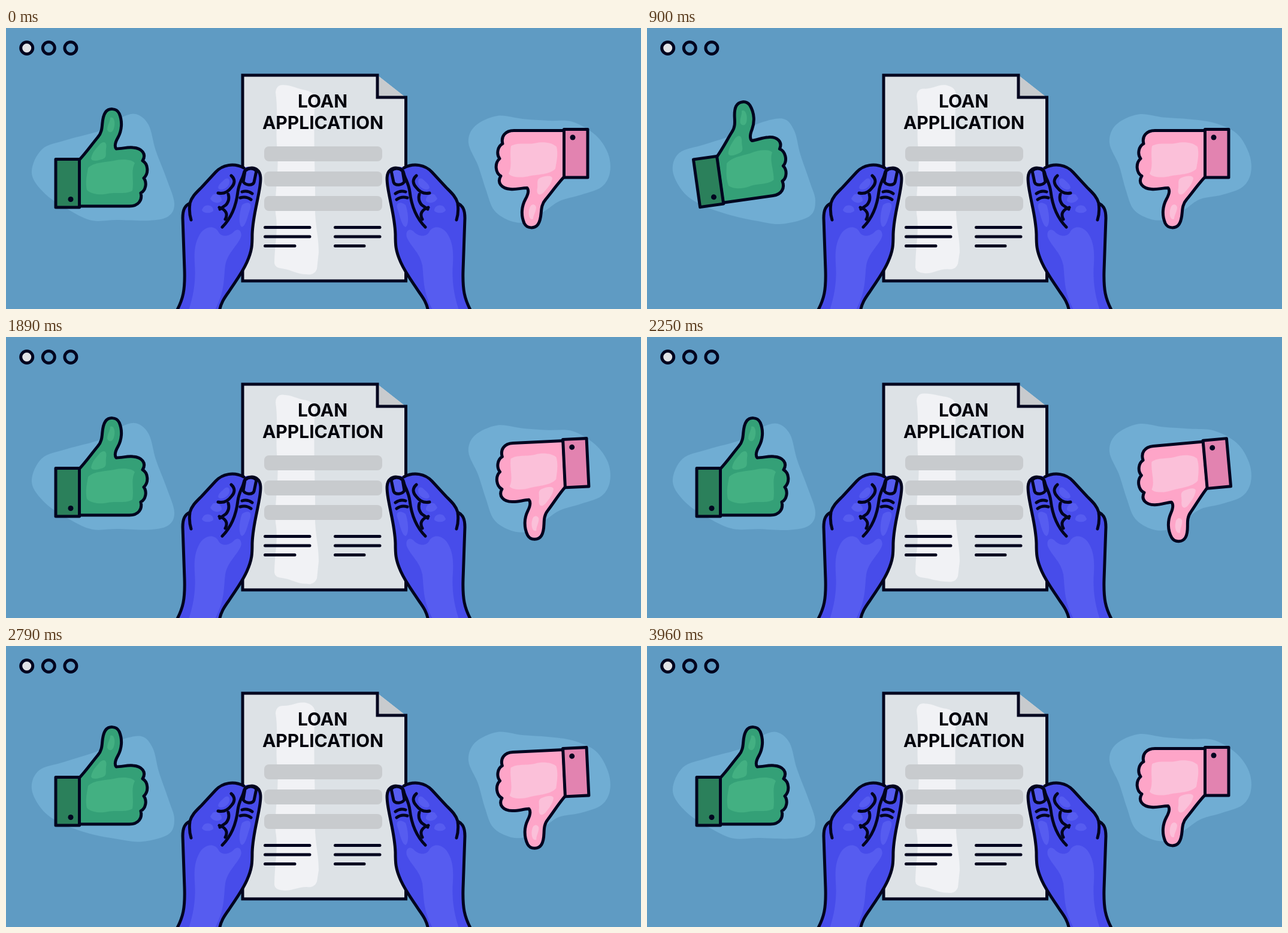
Write an HTML page that moves like this. It is 1060x470 px and loops after 4.05 s.

```html
<!DOCTYPE html>
<html lang="en">
<head>
<meta charset="utf-8">
<title>Loan application</title>
<style>
  html, body { margin: 0; width: 100%; height: 100%; overflow: hidden; background: #5f9bc3; }
  svg { display: block; width: 100%; height: 100%; }
  .ink { stroke: #02041f; stroke-width: 5; stroke-linecap: round; stroke-linejoin: round; }
  .line { fill: none; }
  .blob { fill: #70add3; }
  .title { font: 700 30px Inter, Roboto, sans-serif; text-anchor: middle; fill: #02030c; }
  .up { --skin: #34a077; --glow: #43b082; --cuff: #2b805b; }
  .down { --skin: #fea5c8; --glow: #fbc0d9; --cuff: #e283b0; }
  .skin { fill: var(--skin); }
  .glow { fill: var(--glow); }
  .cuff { fill: var(--cuff); }
  .hand { --skin: #474cea; --glow: #565cf0; }
</style>
</head>
<body>
<svg viewBox="0 0 1060 470">
  <defs>
    <g id="thumb">
      <path class="skin ink" d="M122 221C135 207 143 195 153 183C165 170 157 154 166 141C171 134 184 133 189 143C195 157 193 172 187 183C183 190 180 197 184 202C194 202 202 199 212 200C227 201 235 211 228 222C237 227 239 243 230 251C236 259 233 272 225 276C228 288 221 298 206 298H122Z"/>
      <path class="glow" d="M137 234C147 224 165 225 180 222C194 218 212 220 215 226C208 238 214 256 211 272C200 279 184 274 170 277C158 280 142 278 135 271C132 258 135 246 137 234Z"/>
      <path class="glow" d="M174 150C181 147 183 160 180 168C178 176 171 176 169 170C169 162 174 157 174 150Z"/>
      <path class="glow" d="M157 194C165 187 169 193 167 202C166 210 169 216 162 219C154 222 143 224 142 218C144 208 150 202 157 194Z"/>
      <rect class="cuff ink" x="83" y="219.500" width="39.500" height="80.500"/>
      <circle cx="108" cy="286.500" r="4.500" fill="#02041f"/>
    </g>
    <g id="hand" class="hand">
      <path class="skin" d="M284 475C296 453 299 438 298 405L295 318C295 303 299 297 307 293C310 282 318 275 326 267L350 241C361 229 380 225 397 234C402 231 415 232 420 237C427 243 425 256 424 264C420 292 412 315 411 345C411 362 411 372 402 392C394 410 383 424 372 441C364 452 358 461 356 475Z"/>
      <g class="glow">
        <path d="M322 348C329 333 346 328 354 340C359 351 373 349 381 340C387 334 395 339 392 350C385 366 370 376 366 397C363 421 366 441 347 475H304C314 446 317 420 315 394C314 376 315 361 322 348Z"/>
        <path d="M394 296C402 290 410 291 408 301C403 315 401 330 394 333C387 329 390 306 394 296Z"/>
        <path d="M364 254C371 248 375 254 372 262C368 270 356 273 354 267C355 261 360 258 364 254Z"/>
        <path d="M345 279C352 275 361 282 360 289C354 296 343 291 341 285Z"/>
        <path d="M330 299C338 293 347 299 346 306C340 312 327 309 327 304Z"/>
      </g>
      <path class="ink line" d="M284 475C296 453 299 438 298 405L295 318C295 303 299 297 307 293C310 282 318 275 326 267L350 241C361 229 380 225 397 234M307 294Q305 308 309 321M376 247C384 254 381 262 376 267C370 275 363 278 354 276M371 278Q374 288 367 296L357 303M356 300C367 304 371 311 366 320"/>
      <path class="ink line" d="M361 333C375 319 384 299 387 274C389 258 395 253 397 243C399 233 413 232 419 237C427 243 425 256 424 264C420 292 412 315 411 345C411 362 411 372 402 392C394 410 383 424 372 441C364 452 358 461 356 475"/>
      <path class="ink glow" d="M399 239L396 257Q398 261 404 262Q412 263 414 258L418 239Q409 231 399 239Z"/>
      <path class="ink line" d="M394 274Q403 271 411 277M391 284Q401 281 409 287"/>
    </g>
  </defs>

  <rect width="1060" height="470" fill="#5f9bc3"/>
  <path id="blobL" class="blob"/>
  <path id="blobR" class="blob"/>

  <g class="ink" fill="none">
    <circle cx="34.700" cy="33.500" r="10" fill="#e0e2e6"/>
    <circle cx="71.300" cy="33.500" r="10"/>
    <circle cx="107.900" cy="33.500" r="10"/>
  </g>

  <path fill="#dde2e6" d="M395 79H620L667 116V423H395Z"/>
  <path id="shine" fill="#f1f2f5"/>
  <path fill="#c8cbce" d="M620 79L667 116H620Z"/>
  <path class="ink line" style="stroke-linejoin:miter" d="M620 79H395V423H667.500V116H620V79Z"/>
  <text class="title" x="528.500" y="132.500">LOAN</text>
  <text class="title" x="529" y="169">APPLICATION</text>
  <g fill="#c8cbce">
    <rect x="431" y="198" width="197" height="25" rx="8"/>
    <rect x="431" y="240" width="197" height="25" rx="8"/>
    <rect x="431" y="281" width="197" height="25" rx="8"/>
  </g>
  <path class="ink line" d="M432.500 333.500H507M432.500 349H507M432.500 364.500H482M549.500 333.500H624M549.500 349H624M549.500 364.500H598"/>

  <use href="#hand"/>
  <use href="#hand" transform="translate(1061 0) scale(-1 1)"/>
  <g class="up"><use id="up" href="#thumb"/></g>
  <g class="down" transform="translate(1054 469.500) rotate(180)"><use id="down" href="#thumb"/></g>
</svg>

<script>
const LOOP = 4050, STEP = 90, TAU = 2 * Math.PI;
const el = id => document.getElementById(id);

// Each point: x, y, then its cosine sway (dx, dy) and sine sway (dx, dy).
const blobL = [
  [43, 241, 0, 2], [57, 206, 3, -3], [99, 191, 3, -4], [155, 174, 4, -3],
  [189, 155, 3, -5], [222, 148, -5, -4], [242, 167, -4, -5], [253, 208, -3, -3],
  [270, 255, -2, -3], [281, 291, 0, 2], [271, 315], [232, 325, 8, -3],
  [185, 322, 0, -1], [144, 318, 0, 4], [102, 302, 6, 4], [64, 277, 2, 1]
];
const blobR = [
  [772, 192], [783, 163, 0, 1, 0, -1], [820, 146, 0, 1, 0, -2], [862, 151, 0, 1, 0, -2],
  [905, 154, 0, 1, 0, -2], [946, 158, 0, -1, 0, -1], [984, 178, 0, 1, 1, -2],
  [1005, 210], [1008, 242], [994, 266], [960, 279], [924, 288, 1, 1, 0, -2],
  [900, 304, 1, 1, 0, -2], [872, 322, 0, 2, 0, -3], [843, 322, 0, 1, 0, -2],
  [814, 305, 1, 0, 0, -2], [800, 270, 1, 0], [788, 230]
];

function smooth(pts) {
  const n = pts.length, at = i => pts[(i + n) % n];
  let d = "M" + pts[0];
  for (let i = 0; i < n; i++) {
    const [a, b, c, e] = [at(i - 1), at(i), at(i + 1), at(i + 2)];
    const h1 = b.map((v, k) => v + (c[k] - a[k]) / 6);
    const h2 = c.map((v, k) => v - (e[k] - b[k]) / 6);
    d += `C${h1} ${h2} ${c}`;
  }
  return d + "Z";
}

function sway(pts, c, s) {
  return pts.map(([x, y, cx = 0, cy = 0, sx = 0, sy = 0]) =>
    [x + cx * c + sx * s, y + cy * c + sy * s]);
}

function shine(c, s) {
  const tl = 99.5 - 3.7 * c - 2.5 * s, tr = 100.5 + 3.5 * c - 4.5 * s;
  const bl = 406.5 - 4 * c - s, br = 408 + 4 * c - 3 * s;
  return `M450 ${tl + 12}Q451 ${tl - 1} 463 ${tl - 0.5}C478 ${tl} 486 ${tr - 2} 500 ${tr}` +
    `Q515 ${tr + 3} 516 ${tr + 16}C512 165 517 250 516 310C518 340 522 352 522 375` +
    `L519 ${br - 9}Q515 ${br + 2} 502 ${br}C485 ${br} 477 ${bl + 2} 462 ${bl}` +
    `Q449 ${bl - 1} 448 ${bl - 9}C448 365 455 340 450 310C448 280 456 235 453 205` +
    `C449 170 455 145 450 ${tl + 12}Z`;
}

function nod(t, start, span, angle) {
  const p = Math.min(1, Math.max(0, (t - start) / span));
  return `rotate(${-angle * (1 - Math.cos(TAU * p)) / 2} 83 259.5)`;
}

function draw(t) {
  const w = TAU * 2 * t / LOOP, c = Math.cos(w), s = Math.sin(w);
  el("blobL").setAttribute("d", smooth(sway(blobL, c, s)));
  el("blobR").setAttribute("d", smooth(sway(blobR, c, s)));
  el("shine").setAttribute("d", shine(c, s));
  el("up").setAttribute("transform", nod(t, 0, 1860, 8));
  el("down").setAttribute("transform", nod(t, 1410, 1860, 5.2));
}

const begin = performance.now();
function tick() {
  const t = (performance.now() - begin) % LOOP;
  draw(Math.floor(t / STEP) * STEP);
  requestAnimationFrame(tick);
}
tick();
</script>
</body>
</html>
```
